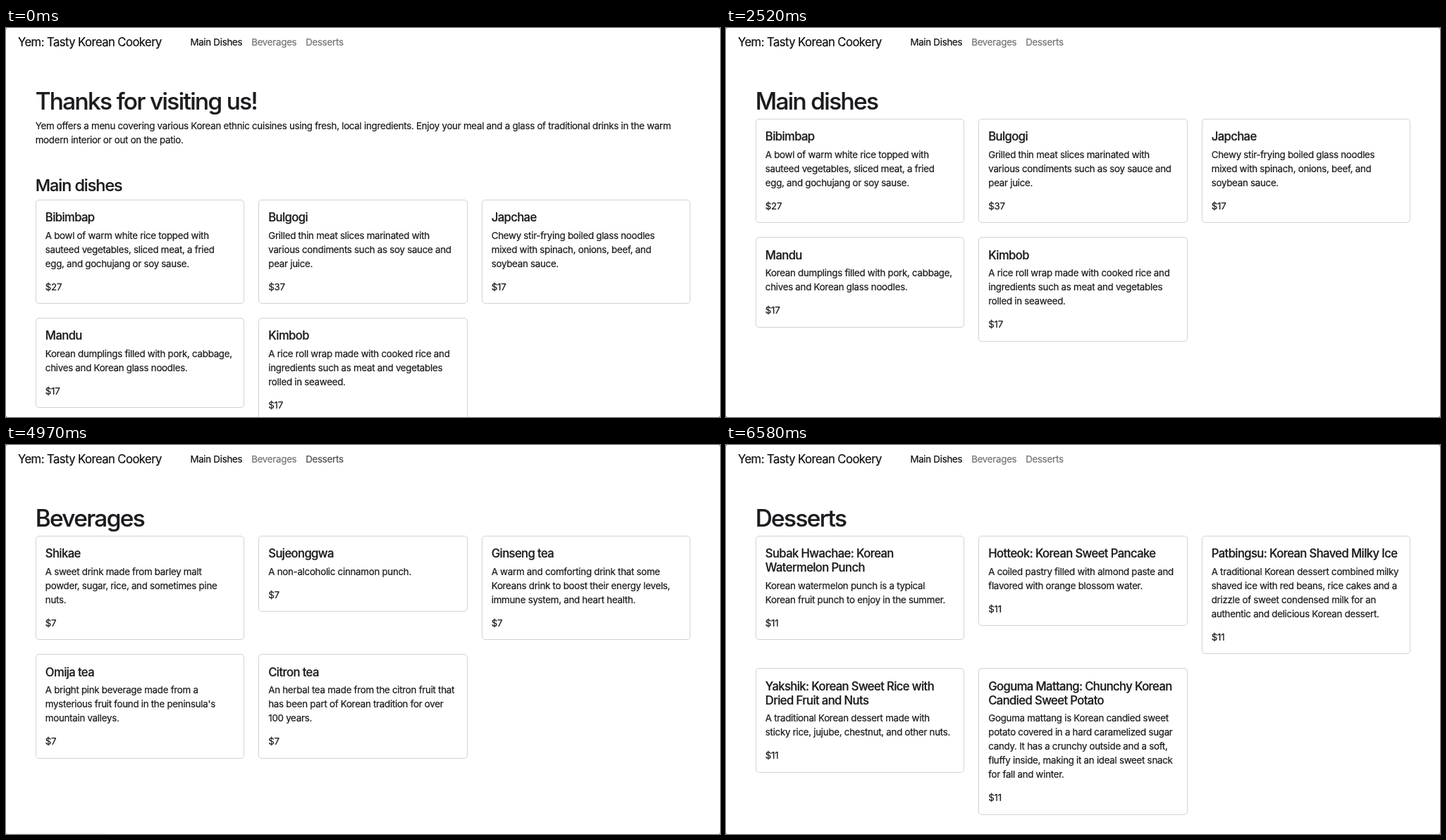
Recreate the animation shown at these times as an HTML page. Size 1013x553 px, loop 6720 ms.

```html
<!DOCTYPE html>
<html lang="en">
<head>
<meta charset="utf-8">
<title>Menu</title>
<style>
  * { box-sizing: border-box; margin: 0; }
  html { font-size: 13.3333px; background: #555; }
  html, body { width: 100%; height: 100%; overflow: hidden; }
  body {
    position: relative; background: #fff; border-radius: 2px;
    font: 1rem/1.5 Inter, "Open Sans", sans-serif; font-optical-sizing: none;
    letter-spacing: -.021em; color: #1b1c1f; white-space: pre;
    -webkit-text-stroke: .22px;
  }
  nav span { position: absolute; top: -.5px; line-height: 40px; }
  nav .brand { left: 17px; font-size: 1.25rem; letter-spacing: -.034em; }
  nav .brand, nav .active { color: #111; }
  section { position: absolute; left: 41.67px; top: 82.5px; width: 929.4px; }
  h1, h2, h3, p { position: relative; top: 1px; }
  h1, h2, h3 { font-weight: 500; line-height: 1.2; margin-bottom: .5rem; }
  h1 { font-size: 2.5rem; letter-spacing: -.048em; }
  h2 { font-size: 1.75rem; letter-spacing: -.042em; margin-top: 3rem; }
  h3 { font-size: 1.25rem; letter-spacing: -.037em; }
  .cards { display: grid; grid-template-columns: repeat(3, 1fr); gap: 20px; align-items: start; }
  .card { border: 1px solid rgba(0, 0, 0, .175); border-radius: 5px; padding: 13.17px; }
  .card p + p { margin-top: 1rem; }
  #status { position: absolute; left: 6px; bottom: 0; height: 1px; background: #f3f3f3; }
</style>
</head>
<body><nav><span class="brand">Yem: Tasty Korean Cookery</span><span class="active" style="left:261.4px">Main Dishes</span><span id="beverages" style="left:348.2px">Beverages</span><span id="desserts" style="left:425.2px">Desserts</span></nav><div id="status"></div>
<script>
const LOOP = 6720, STEP = 70;

// Each dish: title, description, price; "/" breaks a line.
const mains = [
  ['Bibimbap', 'A bowl of warm white rice topped with/sauteed vegetables, sliced meat, a fried/egg, and gochujang or soy sause.', 27],
  ['Bulgogi', 'Grilled thin meat slices marinated with/various condiments such as soy sauce and/pear juice.', 37],
  ['Japchae', 'Chewy stir-frying boiled glass noodles/mixed with spinach, onions, beef, and/soybean sauce.', 17],
  ['Mandu', 'Korean dumplings filled with pork, cabbage,/chives and Korean glass noodles.', 17],
  ['Kimbob', 'A rice roll wrap made with cooked rice and/ingredients such as meat and vegetables/rolled in seaweed.', 17]
];
const drinks = [
  ['Shikae', 'A sweet drink made from barley malt/powder, sugar, rice, and sometimes pine/nuts.', 7],
  ['Sujeonggwa', 'A non-alcoholic cinnamon punch.', 7],
  ['Ginseng tea', 'A warm and comforting drink that some/Koreans drink to boost their energy levels,/immune system, and heart health.', 7],
  ['Omija tea', "A bright pink beverage made from a/mysterious fruit found in the peninsula's/mountain valleys.", 7],
  ['Citron tea', 'An herbal tea made from the citron fruit that/has been part of Korean tradition for over/100 years.', 7]
];
const sweets = [
  ['Subak Hwachae: Korean/Watermelon Punch', 'Korean watermelon punch is a typical/Korean fruit punch to enjoy in the summer.', 11],
  ['Hotteok: Korean Sweet Pancake', 'A coiled pastry filled with almond paste and/flavored with orange blossom water.', 11],
  ['Patbingsu: Korean Shaved Milky Ice', 'A traditional Korean dessert combined milky/shaved ice with red beans, rice cakes and a/drizzle of sweet condensed milk for an/authentic and delicious Korean dessert.', 11],
  ['Yakshik: Korean Sweet Rice with/Dried Fruit and Nuts', 'A traditional Korean dessert made with/sticky rice, jujube, chestnut, and other nuts.', 11],
  ['Goguma Mattang: Chunchy Korean/Candied Sweet Potato', 'Goguma mattang is Korean candied sweet/potato covered in a hard caramelized sugar/candy. It has a crunchy outside and a soft,/fluffy inside, making it an ideal sweet snack/for fall and winter.', 11]
];
const intro = 'Yem offers a menu covering various Korean ethnic cuisines using fresh, local ingredients. Enjoy your meal and a glass of traditional drinks in the warm/modern interior or out on the patio.';

const lines = text => text.replaceAll('/', '\n');
const card = ([title, text, price]) =>
  `<div class="card"><h3>${lines(title)}</h3><p>${lines(text)}</p><p>$${price}</p></div>`;

function addPage(start, cardsAt, title, dishes, extra = '') {
  const el = document.createElement('section');
  el.innerHTML = `<h1>${title}</h1>${extra}<div class="cards">${dishes.map(card).join('')}</div>`;
  document.body.append(el);
  return { start, cardsAt, el, cards: el.lastChild };
}

const pages = [
  addPage(0, 0, 'Thanks for visiting us!', mains, `<p>${lines(intro)}</p><h2>Main dishes</h2>`),
  addPage(2380, 2520, 'Main dishes', mains),
  addPage(4060, 4200, 'Beverages', drinks),
  addPage(5530, 5670, 'Desserts', sweets)
];

// Link hover: [time, amount]; a page load resets it before it fades in again.
const hovers = {
  beverages: [[3500, 0], [3640, 1], [4059, 1], [4060, 0], [4200, 1], [4830, 1], [4970, 0]],
  desserts: [[4830, 0], [4970, 1], [5529, 1], [5530, 0], [5670, 1], [5740, 1], [5950, 0]]
};

function valueAt(keys, t) {
  const i = keys.findIndex(([time]) => time > t);
  if (i < 0) return keys.at(-1)[1];
  if (i === 0) return keys[0][1];
  const [t0, a] = keys[i - 1], [t1, b] = keys[i];
  return a + (b - a) * (t - t0) / (t1 - t0);
}

const byId = id => document.getElementById(id);
const grey = level => `rgb(${level}, ${level}, ${level})`;

function draw() {
  const t = Math.floor(performance.now() % LOOP / STEP) * STEP;
  const current = pages.findLast(page => t >= page.start);
  for (const page of pages) page.el.style.display = page === current ? '' : 'none';
  current.cards.style.display = t >= current.cardsAt ? '' : 'none';
  for (const id in hovers)
    byId(id).style.color = grey(115 - 38 * valueAt(hovers[id], t));
  const status = byId('status').style;
  status.display = t >= 3570 && t < 5950 ? '' : 'none';
  status.width = t < 4900 ? '124px' : '137px';
  requestAnimationFrame(draw);
}
draw();
</script>
</body>
</html>
```
